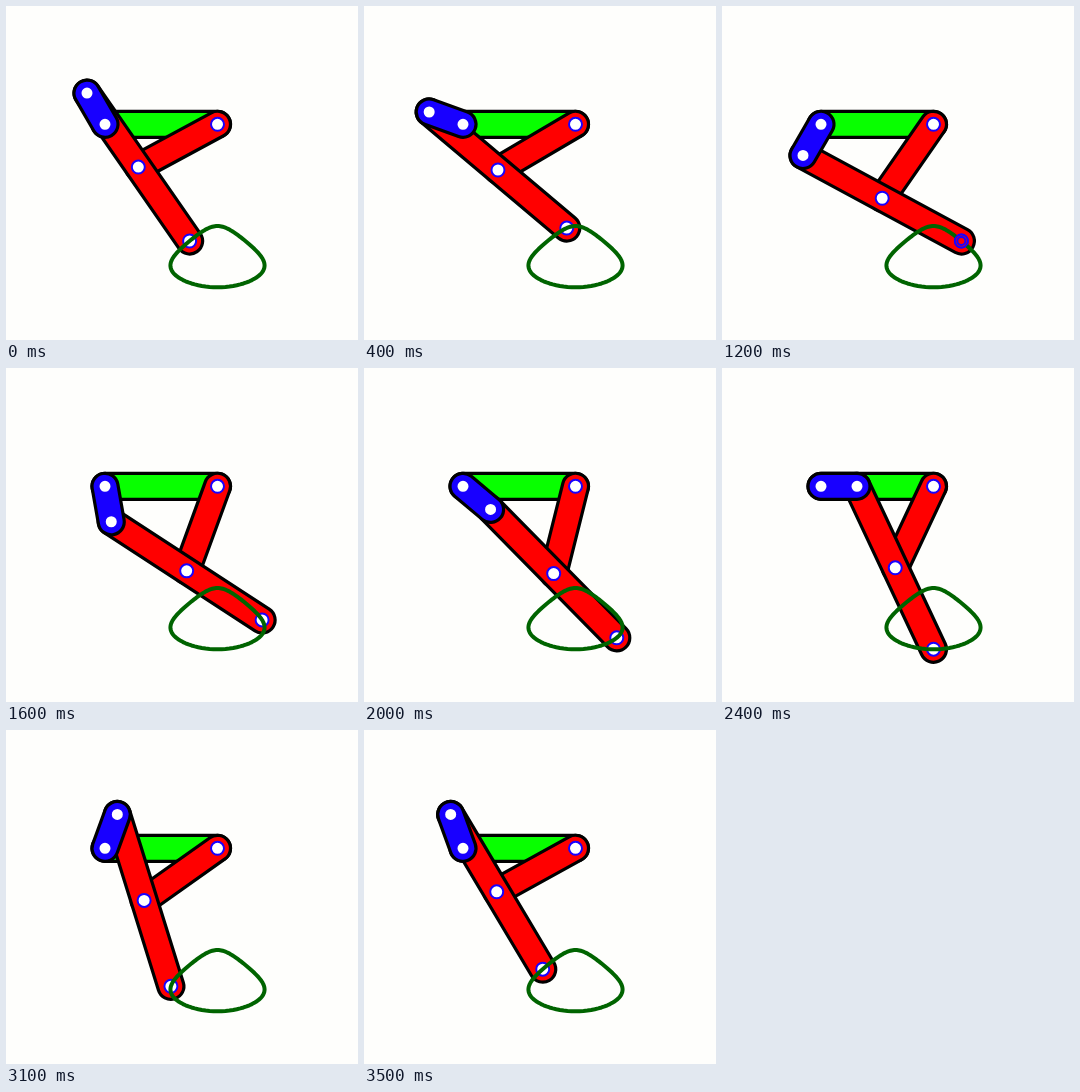
An HTML page with a canvas for the animation above (3.6 s loop, 352x334 px).

```html
<!DOCTYPE html>
<html>
<head>
<meta charset="utf-8">
<title>Four-bar linkage</title>
<style>
html, body { margin: 0; width: 100%; height: 100%; overflow: hidden; background: #fefefc; }
canvas { display: block; }
</style>
</head>
<body>
<canvas id="stage" width="352" height="334"></canvas>
<script>
const ctx = document.getElementById('stage').getContext('2d');
const UNIT = 45, CRANK = 0.8 * UNIT, ARM = 2 * UNIT;
const A = { x: 99, y: 118.3 };
const B = { x: A.x + 2.5 * UNIT, y: A.y };
const BLUE = '#1800ff', RED = '#ff0000', GREEN = '#08ff00';
const STEP = 100, STEPS = 36;

// Joint positions for a crank angle in degrees, clockwise on screen
function solve(deg) {
  const a = deg * Math.PI / 180;
  const tip = { x: A.x + CRANK * Math.cos(a), y: A.y + CRANK * Math.sin(a) };
  const dx = B.x - tip.x, dy = B.y - tip.y, d = Math.hypot(dx, dy);
  const h = Math.sqrt(ARM * ARM - d * d / 4);
  const mid = {
    x: (tip.x + B.x) / 2 - h * dy / d,
    y: (tip.y + B.y) / 2 + h * dx / d
  };
  const end = { x: 2 * mid.x - tip.x, y: 2 * mid.y - tip.y };
  return { tip, mid, end };
}

const path = new Path2D();
for (let deg = 0; deg < 360; deg += 3) {
  const { end } = solve(deg);
  path.lineTo(end.x, end.y);
}
path.closePath();

function bar(p, q, color) {
  const a = Math.atan2(q.y - p.y, q.x - p.x), r = 13;
  ctx.beginPath();
  ctx.arc(p.x, p.y, r, a + Math.PI / 2, a + Math.PI * 1.5);
  ctx.arc(q.x, q.y, r, a - Math.PI / 2, a + Math.PI / 2);
  ctx.closePath();
  ctx.fillStyle = color;
  ctx.fill();
  ctx.strokeStyle = '#000';
  ctx.lineWidth = 3.2;
  ctx.stroke();
}

function ring(p, r, fill) {
  ctx.beginPath();
  ctx.arc(p.x, p.y, r, 0, Math.PI * 2);
  ctx.fillStyle = fill;
  ctx.fill();
  ctx.strokeStyle = BLUE;
  ctx.lineWidth = 2;
  ctx.stroke();
}

function draw(step) {
  const { tip, mid, end } = solve(240 - step * 10);
  const marked = step >= 6 && step < 16;

  ctx.fillStyle = '#fefefc';
  ctx.fillRect(0, 0, 352, 334);
  bar(A, B, GREEN);
  bar(B, mid, RED);
  bar(tip, end, RED);
  bar(A, tip, BLUE);
  for (const p of [A, B, tip, mid, end]) ring(p, 6.5, '#fff');

  ctx.strokeStyle = '#006400';
  ctx.lineWidth = 4;
  ctx.lineJoin = 'round';
  ctx.stroke(path);

  if (marked) {
    ring(end, 6.5, RED);
    ring(end, 4, RED);
  }
}

const start = performance.now();
function tick() {
  draw(Math.floor((performance.now() - start) / STEP) % STEPS);
  requestAnimationFrame(tick);
}
tick();
</script>
</body>
</html>
```
